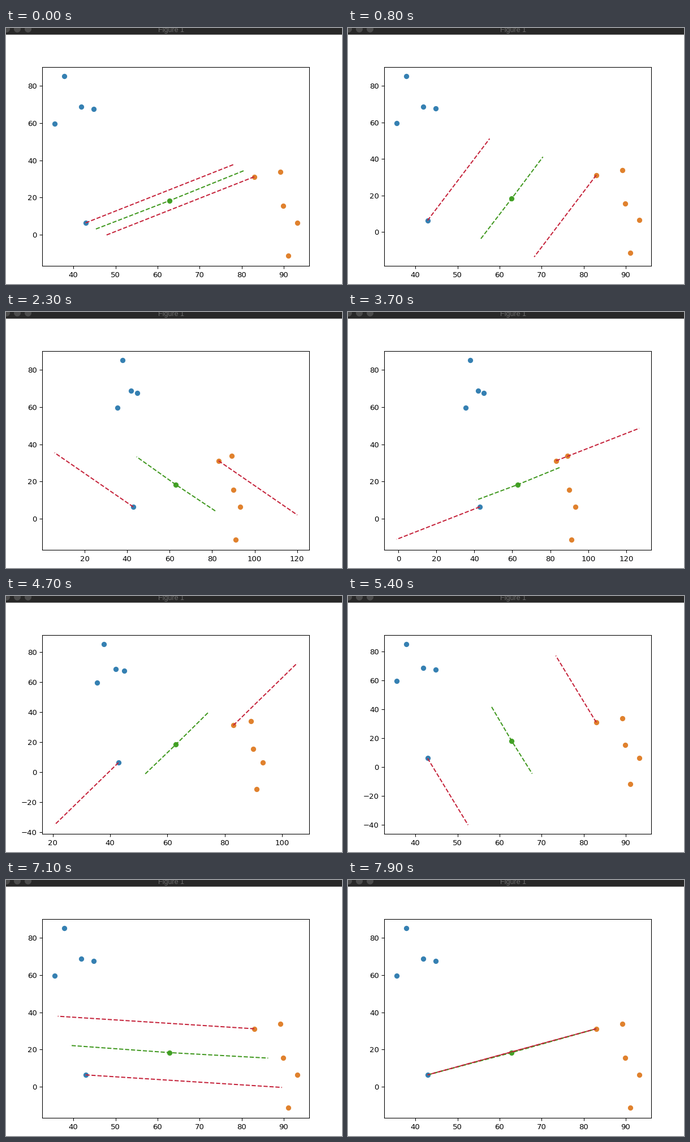
Write a matplotlib script that moves like this. It is 594x452 px and loops after 8000 ms.

```python
import numpy as np
import matplotlib.pyplot as plt
from matplotlib.animation import FuncAnimation
from matplotlib.patches import Circle, Rectangle

W, H, DPI = 594, 452, 96
FRAMES, STEP_MS = 80, 100
LEFT, RIGHT, TOP, BOTTOM = 64.3, 536.4, 68.6, 420.2
BLUE, ORANGE, GREEN, RED = "#3580b2", "#e0812d", "#43a227", "#c5223a"
LINE_GREEN = "#40981f"

# Default plot styling, shrunk a little to suit the window
S = 95.18 / DPI
plt.rcParams.update({"font.family": "DejaVu Sans", "font.size": 10 * S,
                     "lines.linewidth": 1.5 * S, "lines.markersize": 6 * S,
                     "toolbar": "None"})

left_pts = np.array([[35.5, 59.7], [37.85, 85.45], [41.92, 68.7],
                     [44.87, 67.5], [42.88, 6.25]])
right_pts = np.array([[83.0, 31.1], [89.15, 33.8], [89.88, 15.5],
                      [93.23, 6.4], [91.02, -11.55]])
all_pts = np.vstack([left_pts, right_pts])
p, q = left_pts[4], right_pts[0]
mid = (p + q) / 2
centre = np.array([62.88, 18.25])
FLOOR = -12.1

# Moments at which the lines jump ten degrees further, slowly speeding up
k = np.arange(1, 38)
jumps = 225 * (k - 1) - 0.17 * (k - 5) * (k - 24)


def turned(vec, degrees):
    a = np.radians(degrees)
    c, s = np.cos(a), np.sin(a)
    return np.array([c * vec[0] - s * vec[1], s * vec[0] + c * vec[1]])


def padded(values, pad=0.05):
    lo, hi = np.min(values), np.max(values)
    gap = pad * (hi - lo)
    return lo - gap, hi + gap


fig = plt.figure(figsize=(W / DPI, H / DPI), dpi=DPI, facecolor="white")

# Window title bar, in pixel coordinates from the top
bar = fig.add_axes([0, 0, 1, 1])
bar.set(xlim=(0, W), ylim=(H, 0))
bar.axis("off")
for y, height, color in ((0, 11, "#282828"), (11, 1, "#606060")):
    bar.add_patch(Rectangle((0, y), W, height, color=color, lw=0))
for x in (1, 20, 39):
    bar.add_patch(Circle((x, 1.8), 6, color="#4c4c4c", lw=0))
bar.text(292, 7, "Figure 1", color="#6c6c6c", ha="center", va="baseline",
         family="Liberation Sans", size=12.5 * 72 / DPI)

ax = fig.add_axes([LEFT / W, 1 - BOTTOM / H,
                   (RIGHT - LEFT) / W, (BOTTOM - TOP) / H])


def draw(frame):
    count = np.searchsorted(jumps, frame * STEP_MS, side="right")
    v = turned(q - p, 10 * count)
    lines = [(np.array([p, p + v]), RED),
             (np.array([mid - v / 2, centre, mid + v / 2]), LINE_GREEN),
             (np.array([q, q - v]), RED)]

    ax.clear()
    ax.scatter(*left_pts.T, color=BLUE)
    ax.scatter(*right_pts.T, color=ORANGE)
    ax.scatter(*centre, color=GREEN)
    for pts, color in lines:
        ax.plot(*pts.T, "--", color=color)

    xs, ys = np.vstack([all_pts] + [pts for pts, _ in lines]).T
    ax.set_xlim(*padded(xs))
    ax.set_ylim(*padded(np.append(ys, FLOOR)))
    return ax.get_children()


anim = FuncAnimation(fig, draw, frames=FRAMES, init_func=lambda: draw(0),
                     interval=STEP_MS, repeat=True, repeat_delay=0, blit=False)
plt.show()
```
